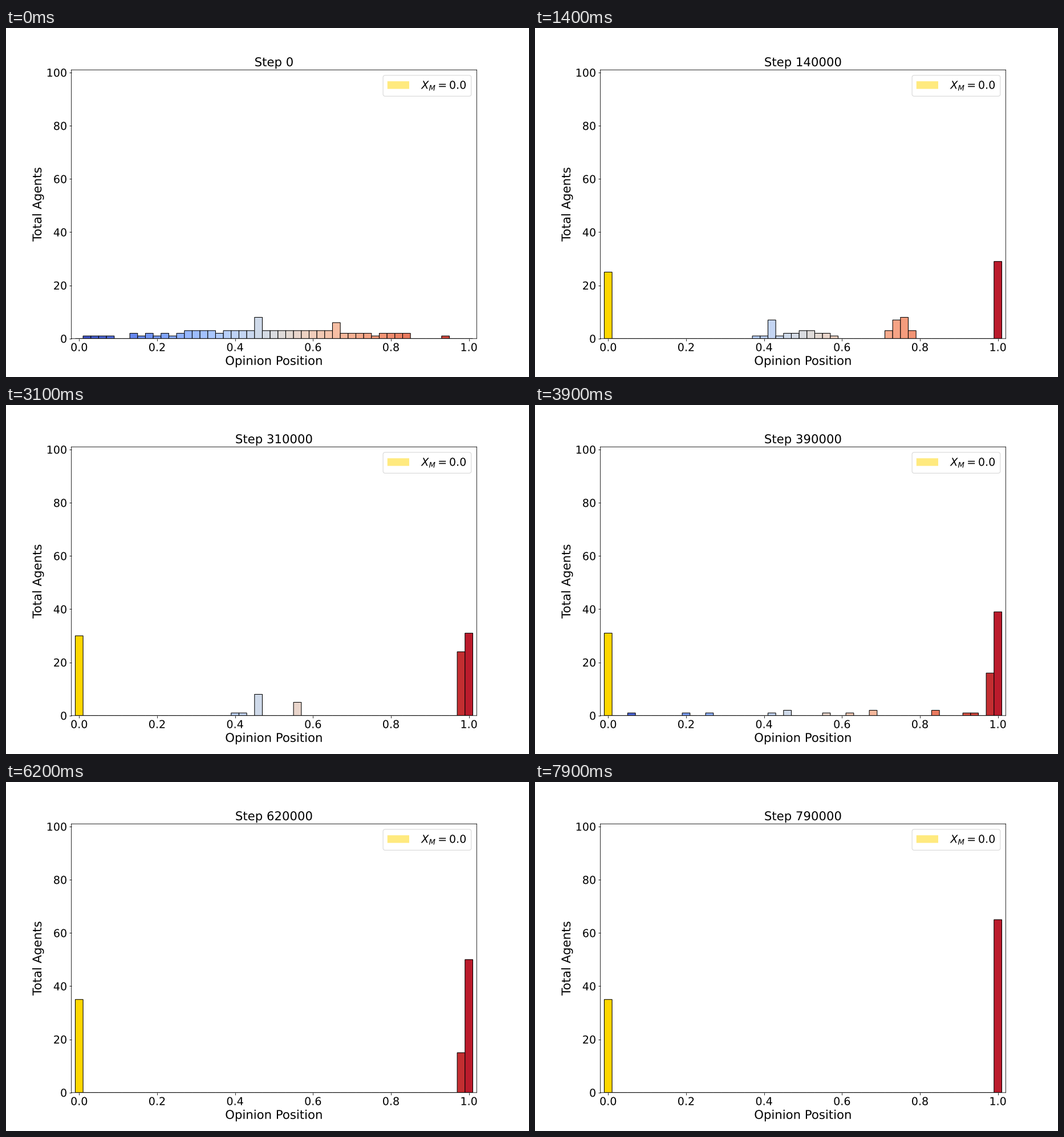
A matplotlib script for the animation above (8000 ms loop, 917 by 611 pixels).

```python
import numpy as np
import matplotlib.pyplot as plt
from matplotlib.animation import FuncAnimation
from matplotlib.patches import Patch
from matplotlib.patheffects import Normal

FRAMES, BINS, AGENTS = 80, 51, 100
DPI = 76.4
RED = BINS - 1

# Opinion groups at key times: (agents, first bin, last bin); the rest are at RED
KEYS = {
    0: [(4, 1, 4), (11, 7, 13), (26, 14, 22), (8, 23), (27, 24, 32), (6, 33),
        (17, 34, 42), (1, 47)],
    14: [(25, 0), (2, 19, 20), (7, 21), (16, 22, 29), (21, 36, 39)],
    23: [(25, 0), (1, 17), (2, 21, 22), (19, 23, 26), (1, 34), (21, 47), (14, 48, 49)],
    31: [(30, 0), (2, 20, 21), (8, 23), (5, 28), (24, 49)],
    48: [(35, 0), (1, 20), (1, 48), (14, 49)],
    55: [(35, 0), (3, 49)],
    62: [(35, 0), (15, 49)],
    69: [(35, 0)],
}


def group(n, first, last=None, pull=0):
    """Bin positions of n agents spread evenly, or pulled toward the middle."""
    last = first if last is None else last
    u = (2 * np.arange(n) + 1) / n - 1
    u = (u + pull * u**3) / (1 + pull)
    return (first + last) / 2 + u * (last - first + 1) / 2.001


def positions(groups, pull):
    x = np.full(AGENTS, float(RED))
    placed = np.concatenate([group(*g, pull=pull) for g in groups])
    x[:len(placed)] = np.rint(placed)
    return x


TIMES = list(KEYS)
POS = [positions(groups, pull=min(t, 1)) for t, groups in KEYS.items()]
RANK = np.arange(AGENTS)
DELAY = 0.5 * (RANK * 0.618 % 1)


def counts(k):
    leg = np.searchsorted(TIMES, k, side="right") - 1
    if leg == len(TIMES) - 1:
        x = POS[-1]
    else:
        a, b = POS[leg], POS[leg + 1]
        u = (k - TIMES[leg]) / (TIMES[leg + 1] - TIMES[leg])
        # the left wing is absorbed early in the first leg
        pace = np.where((leg == 0) & (b == 0), 14 / 9, 1)
        v = np.clip((u * pace - DELAY) / 0.5, 0, 1)
        x = a + (b - a) * v * v * (3 - 2 * v)
        free = (np.minimum(a, b) > 8) & (np.maximum(a, b) < 42)
        x = x + free * 0.8 * np.sin(np.pi * u) * np.sin(2.1 * k + 2.4 * RANK)
    bins = np.clip(np.rint(x), 0, RED).astype(int)
    return np.bincount(bins, minlength=BINS)


# Subpixel placement: no snapping, text drawn as outlines
plt.rcParams.update({"path.snap": False, "path.effects": [Normal()],
                     "text.hinting": "no_hinting"})

fig, ax = plt.subplots(figsize=(917 / DPI, 611 / DPI), dpi=DPI)
colors = plt.get_cmap("coolwarm")(np.arange(BINS) / BINS)
bars = ax.bar(np.arange(BINS) / RED, counts(0), width=1 / RED, color=colors,
              edgecolor="black", linewidth=1)
bars[0].set_facecolor("gold")

ax.set_xlim(-0.02, 1.02)
ax.set_ylim(0, 101)
ax.set_xlabel("Opinion Position", fontsize=20)
ax.set_ylabel("Total Agents", fontsize=20)
ax.tick_params(labelsize=18)
title = ax.set_title("Step 0", fontsize=20)
ax.legend(handles=[Patch(facecolor="gold", alpha=0.5, linewidth=0, label=" $X_M = 0.0$")],
          loc="upper right", fontsize=18)


def update(k):
    for bar, n in zip(bars, counts(k)):
        bar.set_height(n)
    title.set_text(f"Step {k * 10000}")
    return [*bars, title]


anim = FuncAnimation(fig, update, frames=FRAMES, interval=100, repeat=True, repeat_delay=0)
plt.show()
```
